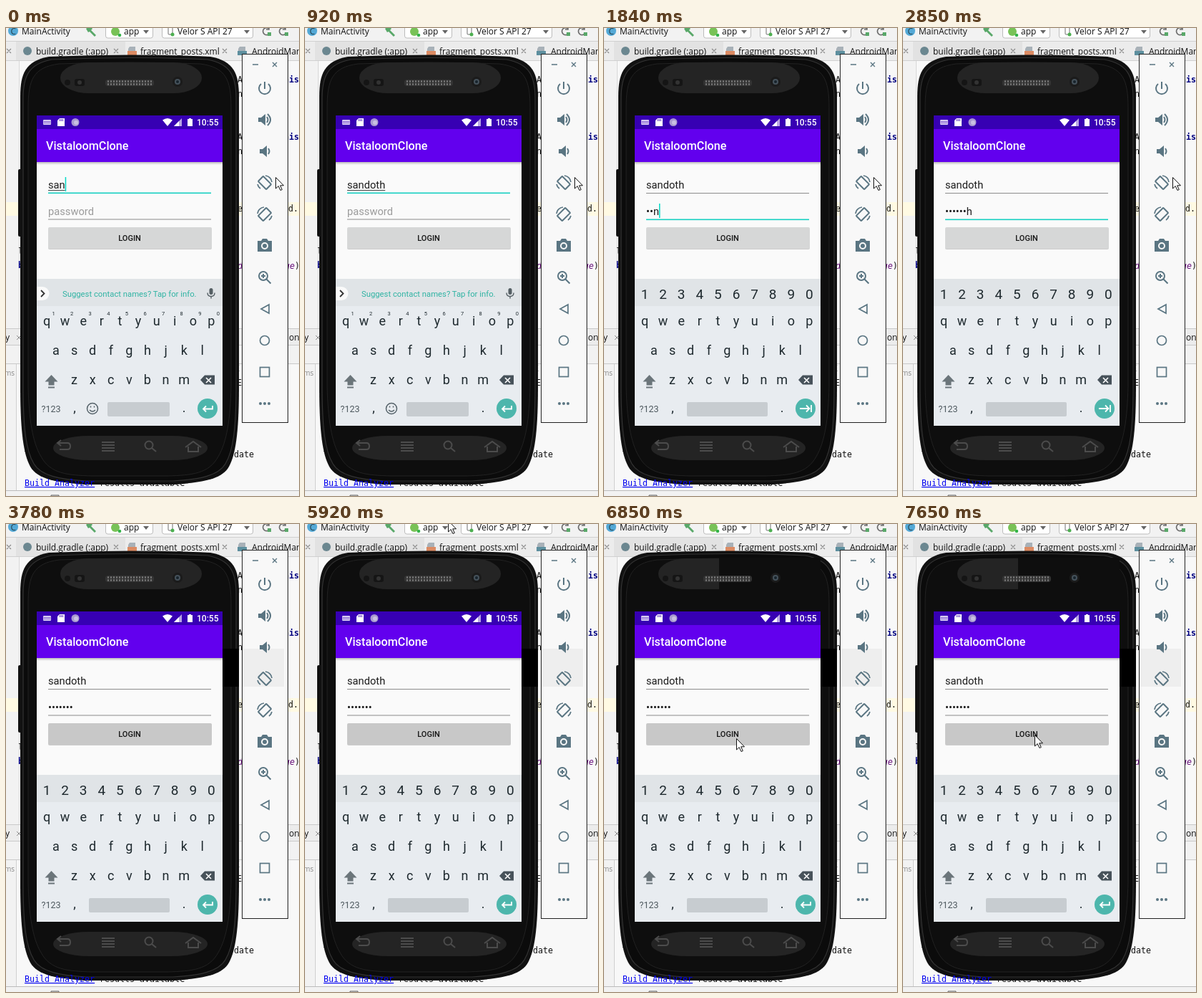
An HTML page for the animation above (8000 ms loop, 410 px wide and 653 px high).

```html
<!DOCTYPE html>
<html lang="en">
<head>
<meta charset="utf-8">
<title>Login form in an emulator</title>
<style>
html, body { margin: 0; width: 100%; height: 100%; overflow: hidden; background: #f8f8f8; }
svg { display: block; width: 410px; height: 653px; }
text { white-space: pre; }
.ui { font: 12px "Open Sans", "Noto Sans", sans-serif; fill: #111; }
.code { font: 11.65px "DejaVu Sans Mono", "Liberation Mono", monospace; fill: #111; }
.kw { font-weight: bold; fill: #000080; }
.app { font-family: Roboto, "Open Sans", sans-serif; }
.field { font-size: 14.7px; fill: #1c1c1c; }
.keys { font-size: 18px; fill: #1e292e; text-anchor: middle; }
.line { fill: none; stroke: currentColor; }
.icons { color: #5a7582; stroke-width: 2; }
.solid { fill: currentColor; stroke: none; }
</style>
</head>
<body>
<svg viewBox="0 0 410 653">
  <defs>
    <linearGradient id="shade" x2="0" y2="1">
      <stop stop-color="#000" stop-opacity=".25"/><stop offset="1" stop-color="#000" stop-opacity="0"/>
    </linearGradient>
    <g id="rotate">
      <rect x="-8" y="-5" width="16" height="10" rx="1" transform="rotate(45)"/>
      <path d="M1-10A10 10 0 0 1 10-1M-10 2A10 10 0 0 0-6 8" stroke-width="1.700"/>
    </g>
  </defs>

  <!-- editor window -->
  <rect width="410" height="653" fill="#f8f8f8"/>
  <rect width="410" height="45" fill="#f2f2f2"/>
  <rect y="19" width="410" height="26" fill="#ececec"/>
  <rect x="14" y="19" width="153" height="26" fill="#e2e2e2"/>
  <path d="M0 18.5H410M0 45.5H410" stroke="#d0d0d0"/>
  <circle cx="10" cy="4" r="7" fill="#54a9d6"/>
  <text x="6.5" y="8.5" class="ui" style="fill:#25424f">C</text>
  <text x="22" y="9" class="ui">MainActivity</text>
  <path d="M112 1l5-4 4 4-2 2 7 7-2 2-7-7-2 1Z" fill="#59a869"/>
  <g fill="#fff" stroke="#bcbcbc"><rect x="139.5" y="-8" width="66" height="22" rx="3"/><rect x="218.5" y="-8" width="127" height="22" rx="3"/></g>
  <circle cx="153" cy="5" r="6" fill="#78c257"/>
  <circle cx="159" cy="10" r="2.3" fill="#35b44a"/>
  <text x="165" y="9" class="ui">app</text>
  <rect x="227" y="-2" width="6" height="11" rx="1" fill="none" stroke="#6e6e6e"/>
  <circle cx="233" cy="9" r="2.5" fill="#4caf50"/>
  <text x="240" y="9" class="ui">Velor S API 27</text>
  <path d="M192 3h8l-4 5ZM333 3h8l-4 5Z" fill="#666"/>
  <g fill="none" stroke="#6e6e6e" stroke-width="1.7"><path d="M368 1a5 5 0 1 0 1 6M368-2v4h-4M391 1a5 5 0 1 0 1 6M391-2v4h-4"/></g>
  <path d="M366 6h5v5h-5ZM390 6h5v5h-5Z" fill="#59a869"/>
  <g stroke="#8b8b8b" stroke-width="1.1"><path d="M1 29l6 6m0-6-6 6M151 29l6 6m0-6-6 6M303 29l6 6m0-6-6 6"/></g>
  <circle cx="30" cy="32" r="6" fill="#6b8790"/>
  <text x="42" y="37" class="ui">build.gradle (:app)</text>
  <path d="M173 26h8v12h-10v-9Z" fill="#a8b1b8"/><path d="M170 32h13v6h-13Z" fill="#dc8b63"/>
  <text x="188" y="37" class="ui">fragment_posts.xml</text>
  <path d="M327 26h8v12h-10v-9Z" fill="#a8b1b8"/><path d="M324 32h13v6h-13Z" fill="#5d8f9e"/>
  <text x="344" y="37" class="ui">AndroidMan</text>

  <rect y="46" width="18" height="374" fill="#f2f2f2"/>
  <path d="M18.5 46V420" stroke="#d8d8d8"/>
  <rect y="243" width="410" height="19" fill="#fffae3"/>
  <g class="code">
    <text x="317" y="76">nA</text><text x="317" y="96">en</text>
    <text x="317" y="156">nA</text><text x="317" y="176">en</text>
    <text x="382" y="76" class="kw">this</text><text x="382" y="156" class="kw">this</text>
    <text x="395" y="256">d.j</text><text x="324" y="256">e</text>
    <text x="17" y="316">l</text><text x="17" y="335" class="kw">b</text>
    <text x="324" y="336" fill="#660e7a" font-style="italic">d</text><text x="390" y="336" fill="#660e7a" font-style="italic">ge<tspan fill="#111" font-style="normal">)</tspan></text>
  </g>
  <rect y="420" width="410" height="48" fill="#ececec"/>
  <rect y="443" width="410" height="25" fill="#f2f2f2"/>
  <path d="M0 419.5H410M0 442.5H410M0 468.5H410" stroke="#c9c9c9"/>
  <text x="-1" y="436" class="ui">y</text>
  <path d="M15 429l6 6m0-6-6 6" stroke="#8b8b8b"/>
  <text x="383" y="436" class="ui">ction</text>
  <rect y="469" width="14" height="177" fill="#f2f2f2"/><path d="M14.5 469V645" stroke="#d0d0d0"/>
  <text x="-2" y="485" class="ui" style="font-size:10px;fill:#888">ms</text>
  <g class="code">
    <text x="320" y="479">E</text><text x="316" y="499">IE</text>
    <text x="26" y="599">T</text><text x="312" y="599">-date</text>
    <text x="131" y="639">results available</text>
  </g>
  <rect y="645" width="410" height="8" fill="#f2f2f2"/><path d="M0 645.5H410" stroke="#bbb"/>
  <path d="M63 653v-1h11v1" fill="none" stroke="#555"/>

  <!-- phone -->
  <rect x="17" y="197" width="8" height="94" rx="2" fill="#101010"/>
  <path d="M20 96C20 64 27 46 60 40Q173 35 286 40C319 46 326 64 326 96V500C326 560 322 594 312 612C302 630 274 634 236 637H110C72 634 44 630 34 612C24 594 20 560 20 500Z" fill="#111"/>
  <path d="M24 98C24 67 32 50 64 44Q173 39 282 44C314 50 322 67 322 98V500C322 558 318 590 307 608C297 625 270 630 234 632H112C76 630 49 625 39 608C28 590 24 558 24 500Z" fill="#0b0b0b" stroke="#333" stroke-width="1.2"/>
  <path d="M31 112C31 72 38 55 74 50Q173 46 272 50C308 55 315 72 315 112V500C314 545 309 578 297 598C284 622 260 624 226 625H120C86 624 62 622 49 598C37 578 32 545 31 500Z" fill="#0e0e0e" stroke="#222"/>
  <rect x="76" y="48" width="198" height="43" rx="40" ry="21" fill="#242424"/>
  <rect id="cover" x="161" y="47" width="142" height="75" fill="#0e0e0e"/>
  <rect x="66" y="569" width="216" height="34" rx="50" ry="17" fill="#242424"/>
  <rect x="139" y="72" width="68" height="9" rx="4" fill="#343434"/>
  <path d="M142 74.5H205M142 78.5H205" stroke="#777" stroke-width="2.5" stroke-dasharray="2 2"/>
  <circle cx="86" cy="76" r="4" fill="#151515"/><rect x="96" y="71" width="14" height="10" rx="3" fill="#151515"/><circle cx="103" cy="76" r="3" fill="#333"/>
  <circle cx="240" cy="75" r="7" fill="#1b1b1b"/><circle cx="240" cy="75" r="4" fill="#45515a"/><circle cx="240" cy="75" r="2" fill="#18242c"/>
  <g fill="none" stroke="#4c4c4c" stroke-width="2">
    <path d="M77 575l-5 4 5 4M72 579h14q4 0 4 4.500t-4 4.500H75M134 578h18M134 582h18M134 586h18M134 590h18"/>
    <circle cx="200" cy="582" r="5.5"/><path d="M204 586l6 5M251 585l11-8 11 8M255 584v7h14v-7"/>
  </g>

  <!-- app screen -->
  <g class="app">
    <rect x="43" y="122" width="260" height="433" fill="#fafafa"/>
    <rect x="43" y="187" width="260" height="4" fill="url(#shade)"/>
    <rect x="43" y="122" width="260" height="19" fill="#3700b3"/>
    <rect x="43" y="141" width="260" height="46" fill="#6200ee"/>
    <rect x="52" y="128" width="11" height="7" rx="1" fill="#d9cdf2"/><path d="M53 130.5h9M53 132.5h9" stroke="#3700b3" stroke-dasharray="1 1"/>
    <path d="M75 126h7v11h-10v-8Z" fill="#fff"/><path d="M75.5 127v3M77.5 127v3M79.5 127v3" stroke="#3700b3" stroke-width=".8"/>
    <circle cx="97" cy="131.500" r="5.5" fill="#a99bd0"/><circle cx="98" cy="132" r="3" fill="#c9c0e2"/>
    <path d="M219 128.500q7-5 14 0l-7 8.500Z" fill="#fff"/><path d="M235 137h11V126Z" fill="#b9a6e4"/><path d="M235 137h7v-7Z" fill="#fff"/>
    <path d="M254 127h2v-1h3v1h2v10h-7Z" fill="#fff"/>
    <text x="267" y="136" font-size="12" font-weight="500" fill="#fff">10:55</text>
    <text x="56" y="170" font-size="16.200" font-weight="500" fill="#fff">VistaloomClone</text>

    <text id="name" class="field" x="59" y="224"></text>
    <rect id="spell" x="59" y="226" height="1" fill="#444"/>
    <rect id="nameLine" x="59" width="228"/>
    <text id="hint" class="field" x="59" y="261" style="fill:#9b9b9b">password</text>
    <text id="pass" class="field" x="59" y="261"></text>
    <rect id="passLine" x="59" width="228"/>
    <rect id="caret" width="1.500" height="20" fill="#03dac5"/>
    <rect x="59" y="279" width="229" height="30" rx="2" fill="#000" opacity=".18"/>
    <rect id="button" x="59" y="278" width="229" height="30" rx="2"/>
    <text x="173" y="297" font-size="11" font-weight="500" text-anchor="middle" fill="#161616">LOGIN</text>

    <rect x="43" y="350" width="260" height="205" fill="#e8ecf0"/>
    <rect x="43" y="350" width="260" height="38" fill="#e0e4e7"/>
    <g id="strip">
      <path d="M43 361h8a9.500 9.500 0 0 1 0 19h-8Z" fill="#fafafa"/><path d="M49 366l4.500 4.500-4.500 4.500" fill="none" stroke="#333" stroke-width="1.800"/>
      <text id="tip" x="79" y="375" font-size="11.300" fill="#2fb3a3">Suggest contact names? Tap for info.</text>
      <rect x="284.500" y="363" width="5" height="9" rx="2.500" fill="#555f64"/><path d="M282 369.500q0 5 5 5t5-5M287 374.500v3" fill="none" stroke="#555f64" stroke-width="1.400"/>
    </g>
    <g id="keys" class="keys"></g>
    <g id="digits" class="keys"></g>
    <path d="M63.500 484l9 9.500h-5v5h-8v-5h-5Z" fill="#6b757a"/><path d="M59 501.500h9" stroke="#6b757a" stroke-width="2"/>
    <path d="M278 484.500h14v13h-14l-6-6.500Z" fill="#47525a"/><path d="M280 488l7 7m0-7-7 7" stroke="#fff" stroke-width="1.600"/>
    <text x="63" y="536" font-size="12.500" text-anchor="middle" fill="#4c575d">?123</text>
    <g id="smile" fill="none" stroke="#56636a" stroke-width="1.500"><circle cx="121" cy="531" r="7.500"/><path d="M117 533q4 4 8 0M118.500 527.500v2M123.500 527.500v2"/></g>
    <rect id="space" y="522" height="20" rx="2" fill="#c7ccd0"/>
    <circle cx="282" cy="531" r="14" fill="#4db6ac"/>
    <g fill="none" stroke="#fff" stroke-width="1.800"><path id="enter" d="M289 527v4.500h-13M280 527.500l-4 4 4 4"/><path id="next" d="M274 531h13M283 526.500l4.500 4.500-4.500 4.500M290 526v10"/></g>
  </g>

  <rect id="blot" x="303" y="174" width="23" height="53"/>
  <text x="26" y="639" class="code" style="fill:#0000f0" text-decoration="underline">Build Analyzer</text>

  <!-- emulator controls -->
  <rect x="330.500" y="36.500" width="64" height="514" fill="#f8f8f8" stroke="#222"/>
  <rect id="patch" x="331" y="174" width="58" height="53" fill="#eee"/>
  <g class="icons line">
    <path d="M345 51h8M373 48l6 6m0-6-6 6" stroke-width="1.400"/>
    <path d="M362 75v10M357 78a8 8 0 1 0 10 0"/>
    <path class="solid" d="M353 125h4l6-5v16l-6-5h-4ZM355 169h4l6-5v16l-6-5h-4Z"/>
    <path d="M365 124q3 4 0 8M366 120q8 8 0 16M367 168q3 4 0 8"/>
    <use href="#rotate" x="362" y="216"/>
    <use href="#rotate" transform="translate(362 260) scale(-1 1)"/>
    <path class="solid" d="M352 297h5l2-3h6l2 3h5v15h-20Z"/><circle cx="362" cy="304" r="4" fill="none" stroke="#f8f8f8"/>
    <circle cx="360" cy="346" r="6"/><path d="M364.500 350.500l6 6M357 346h6M360 343v6"/>
    <path d="M368 386v12l-11-6Z" stroke-width="1.700"/><circle cx="362" cy="436" r="6.500" stroke-width="1.700"/>
    <rect x="355.500" y="473.500" width="13" height="13" stroke-width="1.700"/>
    <g class="solid"><circle cx="356" cy="524" r="2"/><circle cx="362" cy="524" r="2"/><circle cx="368" cy="524" r="2"/></g>
  </g>
  <path id="mouse" d="M.5.500V16l3.700-3.500L7 18.500l2.300-1L6.700 11.800h4.800Z" fill="#fff" stroke="#111"/>
</svg>
<script>
const LOOP = 8000;
const NAME = 'sandoth', PASS = 'sandoth';
const el = Object.fromEntries([...document.querySelectorAll('svg [id]')].map(e => [e.id, e]));

// Each track lists [time, value]; a value holds until the next one.
const tracks = {
  name: [[0, 3], [120, 5], [270, 6], [390, 7]],
  pass: [[0, 0], [1720, 1], [1840, 3], [2000, 4], [2140, 6], [2300, 7]],
  focus: [[0, 'name'], [1320, 'pass'], [3090, '']],
  caret: [[0, 1], [920, 0], [1320, 1], [2850, 0]],
  mouse: [[0, [377, 208]], [3620, [287, 174]], [3780, null], [5920, [200, -5]],
    [6040, [201, 55]], [6160, [200, 130]], [6280, [199, 196]], [6430, [191, 252]],
    [6550, [186, 286]], [6700, [185, 296]], [6850, [185, 299]], [7530, [184, 297]], [7650, [184, 294]]]
};
const at = (key, t) => tracks[key].filter(s => s[0] <= t).pop()[1];
const show = (node, on) => node.setAttribute('visibility', on ? 'visible' : 'hidden');
const set = (node, attrs) => { for (const k in attrs) node.setAttribute(k, attrs[k]); };

function label(parent, x, y, s, size) {
  const node = document.createElementNS('http://www.w3.org/2000/svg', 'text');
  set(node, { x, y });
  if (size) node.style.fontSize = size + 'px';
  node.textContent = s;
  parent.append(node);
  return node;
}

const hints = [];
[['qwertyuiop', 57, 415], ['asdfghjkl', 70, 456], ['zxcvbnm', 95.5, 497]].forEach(([row, x, y]) =>
  [...row].forEach((c, i) => label(el.keys, x + i * 25.6, y, c)));
label(el.keys, 96, 536, ',');
label(el.keys, 249, 536, '.');
[...'1234567890'].forEach((c, i) => {
  hints.push(label(el.keys, 66.5 + i * 25.6, 401, c, 7.5));
  label(el.digits, 57 + i * 25.6, 377.5, c, 19);
});

function underline(node, y, active) {
  set(node, { y, height: active ? 1.6 : 1, fill: active ? '#16d0c2' : '#8c8c8c' });
}

function draw(t) {
  const focus = at('focus', t), n = at('pass', t);
  el.name.textContent = NAME.slice(0, at('name', t));
  const masked = t >= 2970;
  el.pass.textContent = n ? '•'.repeat(masked ? n : n - 1) + (masked ? '' : PASS[n - 1]) : '';
  show(el.hint, !n);
  show(el.spell, focus === 'name');
  set(el.spell, { width: el.name.getComputedTextLength() });
  underline(el.nameLine, focus === 'name' ? 229.5 : 230, focus === 'name');
  underline(el.passLine, 266.5, focus === 'pass');

  show(el.caret, at('caret', t));
  if (focus) {
    const w = el[focus].textContent ? el[focus].getComputedTextLength() : 0;
    set(el.caret, { x: 59 + w, y: focus === 'name' ? 208 : 245 });
  }
  el.button.setAttribute('fill', t < 2970 ? '#d6d7d7' : '#c8c8c8');

  const numeric = t >= 1720;
  show(el.strip, !numeric);
  // Parts inside the strip inherit its state unless hidden themselves.
  el.tip.setAttribute('visibility', t < 1320 ? 'inherit' : 'hidden');
  show(el.digits, numeric);
  show(el.smile, !numeric);
  hints.forEach(h => show(h, !numeric));
  set(el.space, numeric ? { x: 116, width: 113 } : { x: 142, width: 87 });
  const next = numeric && t < 3090;
  show(el.next, next);
  show(el.enter, !next);

  show(el.blot, t >= 3620);
  show(el.patch, t >= 3620);
  show(el.cover, t >= 6040);
  const p = at('mouse', t);
  show(el.mouse, p);
  if (p) el.mouse.setAttribute('transform', `translate(${p})`);
}

const start = performance.now();
function tick(now) {
  draw(Math.max(0, now - start) % LOOP);
  requestAnimationFrame(tick);
}
draw(0);
requestAnimationFrame(tick);
</script>
</body>
</html>
```
